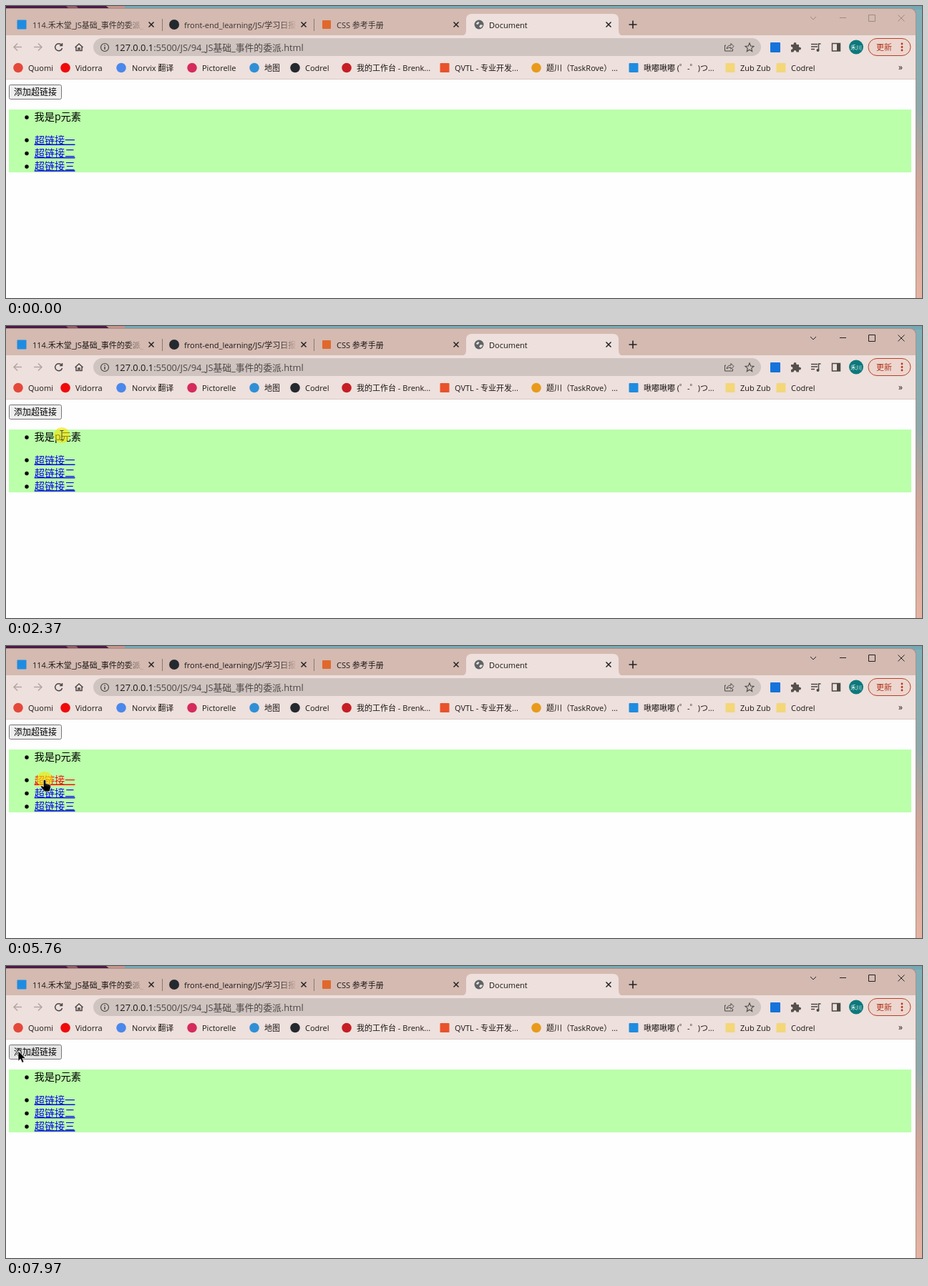
An HTML page that plays this animation: 1280 px wide and 409 px high, repeating every 8 s.

```html
<!DOCTYPE html>
<html lang="zh-CN">
<head>
<meta charset="utf-8">
<title>Document</title>
<style>
html, body { margin: 0; width: 100%; height: 100%; overflow: hidden; background: #fff; }
svg { display: block; width: 100%; height: 100%; font-family: "Open Sans", "Noto Sans CJK SC", "Noto Sans CJK", sans-serif; }
.line { fill: none; stroke: #4c4846; stroke-width: 1.5; }
.pale { stroke: #b3a6a2; }
</style>
</head>
<body>
<svg id="stage" viewBox="0 0 1280 409">
  <defs>
    <linearGradient id="wall" x2="0" y2="1">
      <stop offset="0" stop-color="#7fb0ba"/><stop offset=".35" stop-color="#8fa9ab"/>
      <stop offset=".6" stop-color="#cfa398"/><stop offset="1" stop-color="#e6b4a2"/>
    </linearGradient>
    <linearGradient id="fade"><stop offset="0" stop-color="#d4bab1" stop-opacity="0"/><stop offset="1" stop-color="#d4bab1"/></linearGradient>
    <filter id="shadow" x="-5%" y="-10%" width="110%" height="125%">
      <feDropShadow dx="0" dy="1" stdDeviation="1.8" flood-opacity=".4"/>
    </filter>
  </defs>
  <g id="browser"></g>
  <g id="page"></g>
  <g id="dialog"></g>
  <circle id="press" r="11" fill="#f5e400" fill-opacity=".62"/>
  <g id="cursor">
    <path id="arrow" d="M0 0V14.3L3.3 11.2L5.6 16.4L8 15.3L5.8 10.3H10.4Z" fill="#000" stroke="#fff" stroke-width=".7"/>
    <g id="hand">
      <path d="M-1.7 1.5Q0 -1 1.7 1.5V5.6L7 7Q8.9 7.6 8.5 10.5L7 16.8H0L-5.4 10.4Q-5.6 8.2 -3.4 8.9L-1.7 10.2Z" fill="#000" stroke="#fff" stroke-width=".6"/>
      <path d="M2 6V9M4.4 6.8V9.4M6.6 7.5V9.8" stroke="#888" stroke-width=".5"/>
    </g>
    <path id="beam" d="M-2.5 -6.5H2.5M0 -6.5V6.5M-2.5 6.5H2.5" fill="none" stroke="#444"/>
  </g>
</svg>
<script>
const $ = id => document.getElementById(id);
const text = (x, y, s, size = 11, fill = '#1c1817', more = '') =>
  `<text x="${x}" y="${y}" font-size="${size}" fill="${fill}" ${more}>${s}</text>`;
const rect = (x, y, w, h, fill, r = 0, more = '') =>
  `<rect x="${x}" y="${y}" width="${w}" height="${h}" rx="${r}" fill="${fill}" ${more}/>`;
const dot = (x, y, r, fill) => `<circle cx="${x}" cy="${y}" r="${r}" fill="${fill}"/>`;
const line = (d, more = 'class="line"') => `<path d="${d}" ${more}/>`;
const square = (x, y, s, fill) => rect(x - s / 2, y - s / 2, s, s, fill, 1);

const closeMark = x => line(`M${x - 3.5} 22.5l7 7m0 -7l-7 7`, 'stroke="#222" stroke-width="1.5"');

function drawBrowser() {
  const wallpaper = rect(0, 0, 1280, 409, 'url(#wall)') + rect(0, 0, 1280, 5, '#74a9b4') +
    rect(0, 0, 150, 5, '#4a1a44') + line('M84 0h14l5 5h-14z', 'fill="#8d5a68"') +
    line('M140 0h26v5h-20z', 'fill="#c3958c"');
  const frame = rect(-10, 3, 1282, 420, '#a89089', 8) + rect(-10, 4, 1281, 420, '#d4bab1', 8) +
    line('M635 42Q643 42 643 34V19Q643 11 651 11H848Q856 11 856 19V34Q856 42 864 42Z', 'fill="#eee0dc"') +
    rect(0, 41, 1271, 62, '#eee0dc') + rect(0, 102, 1271, 1, '#d9cbc6') + rect(0, 103, 1271, 306, '#fefefe');

  const tabs = `<g id="tabs">` +
    text(37, 31, '114.禾木堂_JS基础_事件的委派_') +
    text(249, 31, 'front-end_learning/JS/学习日报') +
    text(462, 31, 'CSS 参考手册') + '</g>' +
    [168, 380].map(x => rect(x, 14, 26, 24, 'url(#fade)') + rect(x + 26, 14, 20, 24, '#d4bab1')).join('') +
    square(22, 26, 13, '#1d8ce0') + dot(235, 26, 7, '#24292f') + square(448, 26, 12, '#e0682c') +
    dot(661, 26, 6.5, '#5f6368') + line('M656.5 25l3 -3l2 1l-2 3zM661 29l2 -3l3.5 1l-3 3.5z', 'fill="#eee0dc"') +
    text(675, 31, 'Document') + [203, 416, 629, 842].map(closeMark).join('') +
    line('M218.5 18v17M430.5 18v17', 'stroke="#8b7972"') +
    line('M870.5 26h11M876 20.5v11', 'stroke="#222" stroke-width="1.6"') +
    line('M1124 15l4 4l4 -4M1165 16.5h9M1205.5 12.5h9v9h-9zM1246.5 12.5l9 9m0 -9l-9 9', 'id="controls" fill="none"');

  const toolbar =
    line('M22 57.5h-11m5 -5l-5 5l5 5M39 57.5h11m-5 -5l5 5l-5 5', 'class="line pale"') +
    line('M77.5 54.5A5 5 0 1 0 78.5 59M78.5 52v3.5h-3.5') +
    line('M96.5 58l5.5 -5l5.5 5M98 57v5.5h3v-3.5h2v3.5h3v-5.5') +
    rect(122, 45, 933, 25, '#cfc4c0', 12.5) +
    '<circle cx="138" cy="58" r="5.5" class="line" style="stroke-width:1.2"/>' + line('M138 57v4M138 54.5v1.3') +
    text(152, 62.5, '127.0.0.1<tspan fill="#4d4644">:5500/JS/94_JS基础_事件的委派.html</tspan>', 12.8) +
    line('M1006 55h-1.5v8h11v-3M1007 60q1 -5 6 -5v-2.5l4 4l-4 4v-2.5q-4 0 -6 2z', 'class="line" style="stroke-width:1"') +
    line('M1039 52l1.7 4l4.3 .4l-3.3 2.8l1 4.3l-3.7 -2.3l-3.7 2.3l1 -4.3l-3.3 -2.8l4.3 -.4z', 'class="line" style="stroke-width:1.1"') +
    square(1075, 58, 14, '#1673dc') +
    line('M1097 54h3.5q0 -3 2 -3t2 3h3.5v3.5q3 0 3 2t-3 2v3h-3.5q0 -2.5 -2 -2.5t-2 2.5h-3.5v-3.5q2.5 0 2.5 -2t-2.5 -2z', 'fill="#56504d"') +
    line('M1125 53.5h9M1125 57h9M1125 60.5h5M1135.5 62v-9h3') + dot(1134.5, 62, 2, '#4c4846') +
    line('M1154.5 52.5h11v10.5h-11z') + rect(1161, 52, 5, 11, '#4c4846') +
    dot(1188, 57.5, 10, '#0b797c') + text(1188, 60.5, '禾川', 8, '#fff', 'text-anchor="middle"') +
    rect(1205, 45.5, 59, 24, '#ecd6cf', 12, 'stroke="#b64127"') + text(1216, 61.7, '更新', 11, '#b3341a') +
    [53, 57.5, 62].map(y => dot(1252, y, 1.4, '#b3341a')).join('');

  const marks = [
    [17, 31, '#e5483a', 'Quomi'], [83, 97, '#f00a0a', 'Vidorra'], [161, 176, '#4a88ec', 'Norvix 翻译'],
    [260, 274, '#d62a5c', 'Pictorelle'], [347, 361, '#2f8fd6', '地图'], [404, 418, '#24292f', 'Codrel'],
    [476, 490, '#c71d23', '我的工作台 - Brenk...'], [613, 627, '#e8532b', 'QVTL - 专业开发...', 1],
    [741, 755, '#e89a1c', '题川（TaskRove）...'], [877, 891, '#1d8ce0', '啾嘟啾嘟 (゜-゜)つ...', 1],
    [1012, 1026, '#f3d778', 'Zub Zub', 1], [1083, 1097, '#f3d778', 'Codrel', 1]
  ].map(([x, tx, fill, label, box]) =>
    (box ? square(x, 86.5, 13, fill) : dot(x, 86.5, 6.8, fill)) + text(tx, 91, label)).join('') +
    text(1247, 90, '»', 12);
  $('browser').innerHTML = wallpaper + frame + tabs + toolbar + marks;
}

function drawPage() {
  const links = ['超链接一', '超链接二', '超链接三'].map((s, i) =>
    text(39.7, 192.5 + i * 18.4, s, 14.2, '#00e', `id="link${i}" text-decoration="underline"`));
  $('page').innerHTML =
    rect(4.5, 110.5, 73, 20, '#efefef', 2, 'id="button" stroke="#767676"') +
    text(41, 125.3, '添加超链接', 12, '#000', 'text-anchor="middle"') +
    rect(4, 145, 1261, 88, '#bbffaa') +
    [156, 188, 206.5, 225].map(y => dot(29, y, 2.7, '#000')).join('') +
    text(39.5, 160.3, '我是p元素', 14.2, '#000') + links.join('');
}

function drawDialog() {
  $('dialog').innerHTML = rect(434, 70.5, 399, 115, '#fff', 4, 'filter="url(#shadow)"') +
    text(448.5, 100, '127.0.0.1:5500 显示', 13.5, '#202124') +
    text(448, 124.3, '我是ul的单击响应函数', 11.66, '#333') +
    rect(762, 142.5, 57, 28.5, '#fff', 4, 'stroke="#1a73e8" stroke-width="2"') +
    rect(764, 144.5, 53, 24.5, '#1a73e8', 2.5) +
    text(791, 161.3, '确定', 11, '#fff', 'text-anchor="middle"');
}

// Pointer stops: time, x, y
const path = [
  [370, 700, 409], [860, 568, 197], [1210, 568, 197], [1510, 790, 157], [1670, 790, 157],
  [1990, 186, 170], [2340, 78, 153], [2560, 78, 153], [2970, 790, 157], [3130, 790, 157],
  [3630, 179, 180], [3660, 179, 180], [3990, 12, 185], [4280, 12, 185], [4990, 790, 161],
  [5130, 790, 161], [5680, 54, 187], [5890, 54, 187], [6190, 790, 158], [6350, 790, 158],
  [6710, 51, 224], [7040, 51, 224], [7300, 713, 205], [7430, 790, 158], [7570, 790, 158], [7950, 17, 119]
];
const presses = [880, 1530, 2350, 2990, 4000, 5000, 5690, 6210, 6750, 7440];
const dialogs = [[1000, 1640], [2480, 3110], [4370, 5110], [5820, 6330], [6880, 7560]];
const DELAY = 100, OPEN = 180, CLOSE = 150, RISE = 11, HOLD = 120;

function pointer(t) {
  const i = path.findIndex(p => p[0] > t);
  if (i < 1) return path[i < 0 ? path.length - 1 : 0].slice(1);
  const [t0, x0, y0] = path[i - 1], [t1, x1, y1] = path[i];
  const u = (t - t0) / (t1 - t0), k = u * u * (3 - 2 * u);
  return [x0 + (x1 - x0) * k, y0 + (y1 - y0) * k];
}

// Hovered part: link index, 'text', 'button' or null
function hovered([x, y]) {
  if (x >= 39 && x <= 97 && y >= 179 && y < 233) return Math.min(2, Math.floor((y - 179) / 18.4));
  if (x >= 39 && x <= 106 && y >= 146 && y < 165) return 'text';
  if (x >= 4 && x <= 78 && y >= 110 && y < 131) return 'button';
  return null;
}

function render(t) {
  const focused = t >= 30;
  $('controls').setAttribute('stroke', focused ? '#222' : '#9d8a83');
  $('tabs').setAttribute('opacity', focused ? 1 : .85);

  const [x, y] = pointer(t);
  // The page is blocked shortly before its dialog shows
  const box = dialogs.find(([a, b]) => t >= a - DELAY && t < b + CLOSE);
  const modal = box && t < box[1];
  let alpha = 0, shift = 0;
  if (modal) {
    const p = Math.max(0, Math.min(1, (t - box[0]) / OPEN));
    alpha = Math.min(1, p * 3);
    shift = -RISE * (1 - p);
  } else if (box) {
    const p = (t - box[1]) / CLOSE;
    alpha = 1 - p;
    shift = -RISE * p;
  }
  $('dialog').setAttribute('opacity', alpha);
  $('dialog').setAttribute('transform', `translate(0 ${Math.round(shift)})`);

  const over = t < path[0][0] ? null : hovered(pointer(modal ? box[0] - DELAY : t));
  for (let i = 0; i < 3; i++) $('link' + i).setAttribute('fill', over === i ? '#f00' : '#00e');
  $('button').setAttribute('fill', over === 'button' ? '#e5e5e5' : '#efefef');

  const inBox = modal && x > 434 && x < 833 && y > 70 && y < 186;
  const shape = inBox ? 'arrow' : typeof over === 'number' ? 'hand' : over === 'text' ? 'beam' : 'arrow';
  for (const id of ['arrow', 'hand', 'beam']) $(id).style.display = id === shape ? '' : 'none';
  $('cursor').style.display = t < path[0][0] ? 'none' : '';
  $('cursor').setAttribute('transform', `translate(${x} ${y})`);

  $('press').style.display = presses.some(p => t >= p && t < p + HOLD) ? '' : 'none';
  $('press').setAttribute('cx', x);
  $('press').setAttribute('cy', y);
}

drawBrowser();
drawPage();
drawDialog();
const start = performance.now();
function tick() {
  render((performance.now() - start) % 8000);
  requestAnimationFrame(tick);
}
tick();
</script>
</body>
</html>
```
